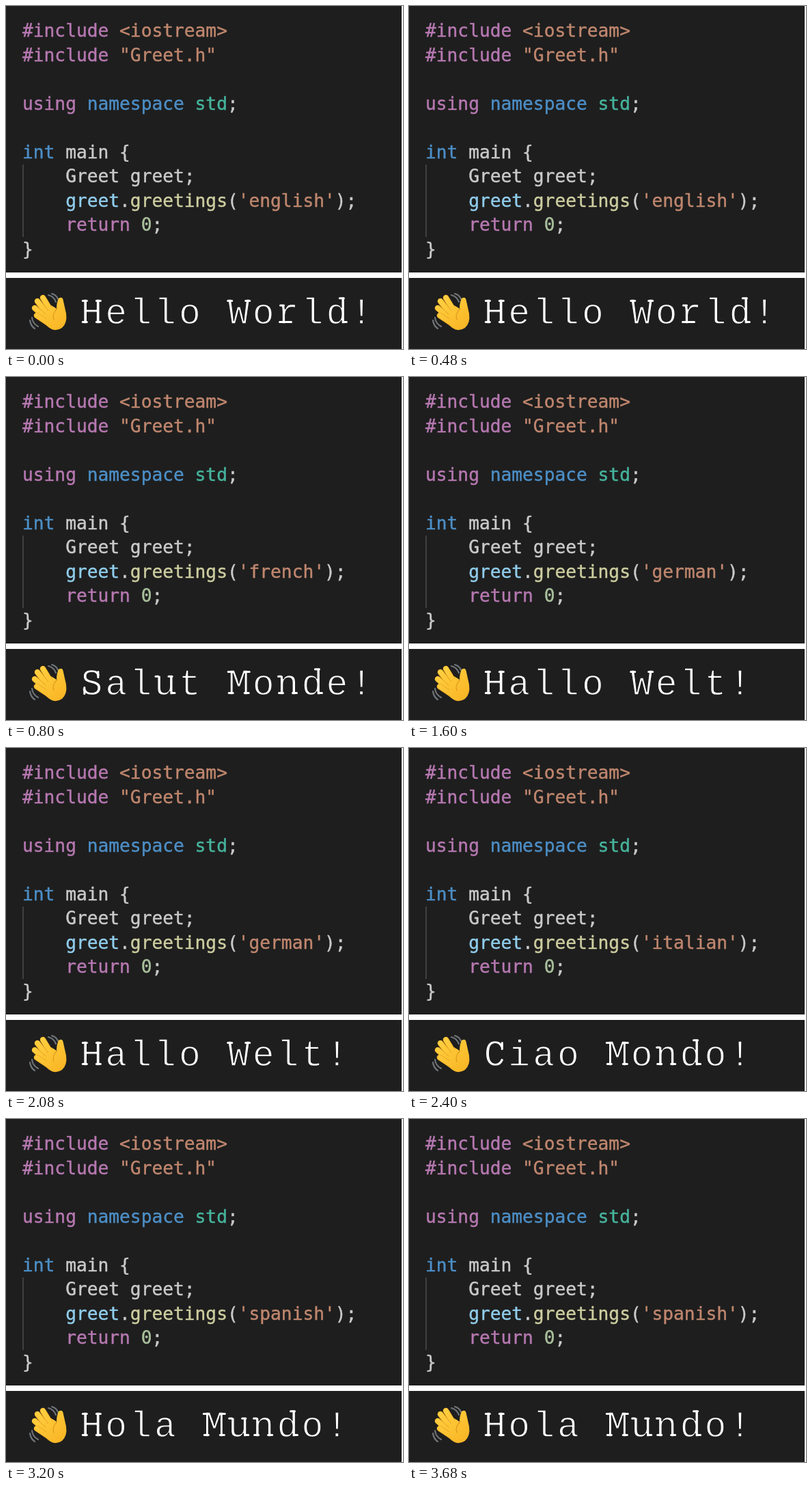
Write an HTML page with a canvas that moves like this. It is 581 px wide and 502 px high and loops after 4 s.

```html
<!DOCTYPE html>
<html lang="en">
<head>
<meta charset="utf-8">
<title>Greetings</title>
<style>
  html, body { margin: 0; width: 100%; height: 100%; overflow: hidden; background: #fff; }
  canvas { display: block; }
</style>
</head>
<body>
<canvas id="stage" width="581" height="502"></canvas>
<script>
const ctx = document.getElementById('stage').getContext('2d');
const HOLD = 800;
const BACKGROUND = '#1e1e1e';
const GREETINGS = [
  ['english', 'Hello World!'],
  ['french', 'Salut Monde!'],
  ['german', 'Hallo Welt!'],
  ['italian', 'Ciao Mondo!'],
  ['spanish', 'Hola Mundo!'],
];
const COLOR = {
  keyword: '#b678b1', type: '#4c8ec6', string: '#bf866e', space: '#46b49d',
  variable: '#90cdec', method: '#cdcda0', number: '#a9bf9c', plain: '#cacaca',
};
const CODE = { x: 24, baseline: 45, lineHeight: 35.55, font: '26.22px "DejaVu Sans Mono", monospace' };
const TITLE = { x: 125.3, baseline: 464.5, pitch: 35.9, font: '53px "Liberation Mono", monospace' };

// Each line is a list of [color name, text] tokens.
const codeLines = language => [
  [['keyword', '#include '], ['string', '<iostream>']],
  [['keyword', '#include '], ['string', '"Greet.h"']],
  [],
  [['keyword', 'using '], ['type', 'namespace '], ['space', 'std'], ['plain', ';']],
  [],
  [['type', 'int '], ['plain', 'main {']],
  [['plain', '    Greet greet;']],
  [['variable', '    greet'], ['plain', '.'], ['method', 'greetings'], ['plain', '('],
    ['string', `'${language}'`], ['plain', ');']],
  [['keyword', '    return '], ['number', '0'], ['plain', ';']],
  [['plain', '}']],
];

function drawCode(language) {
  ctx.font = CODE.font;
  ctx.textAlign = 'left';
  ctx.lineWidth = 0.45;
  codeLines(language).forEach((tokens, row) => {
    const y = CODE.baseline + row * CODE.lineHeight;
    let x = CODE.x;
    for (const [kind, text] of tokens) {
      ctx.fillStyle = ctx.strokeStyle = COLOR[kind];
      ctx.fillText(text, x, y);
      ctx.strokeText(text, x, y);
      x += ctx.measureText(text).width;
    }
  });
  ctx.fillStyle = '#404040';
  ctx.fillRect(24, 232, 2, 106);
}

function line(color, width, ...points) {
  ctx.strokeStyle = color;
  ctx.lineWidth = width;
  ctx.beginPath();
  points.forEach(([x, y]) => ctx.lineTo(x, y));
  ctx.stroke();
}

// Slab marks relative to the letter's centre and baseline.
const slab = (x, y, left = 3, right = 3) => [[x - left, y], [x + right, y]];
const tick = (x, top, bottom) => [[x, top], [x, bottom]];
const FOOT = -1.9, CAP = -33, MID = -26.3, ASCENDER = -36.8;
const SLABS = {
  H: [-10, 10].flatMap(x => [slab(x, CAP), slab(x, FOOT)]),
  M: [slab(-11.5, CAP, 4, 2), slab(11.5, CAP, 2, 4), slab(-11.5, FOOT), slab(11.5, FOOT)],
  W: [slab(-13, CAP), slab(13, CAP)],
  n: [slab(-10, MID, 4, 0), slab(-10, FOOT), slab(10, FOOT)],
  u: [slab(-10, MID, 4, 0), slab(10, MID, 5, 0), slab(10, FOOT, 0, 4)],
  d: [slab(10, ASCENDER, 6, 0), slab(10, FOOT, 0, 4)],
  r: [slab(-6, MID, 5, 0), slab(-6, FOOT, 6, 11)],
  C: [tick(11, CAP, -24)],
  S: [tick(9.5, CAP, -25), tick(-10.5, -10, -1)],
};

function drawTitle(text) {
  ctx.font = TITLE.font;
  ctx.textAlign = 'center';
  ctx.lineCap = 'round';
  ctx.lineJoin = 'round';
  [...text].forEach((letter, i) => {
    ctx.save();
    ctx.translate(TITLE.x + i * TITLE.pitch, TITLE.baseline);
    ctx.fillStyle = '#fff';
    ctx.fillText(letter, 0, 0);
    // A background outline thins the letter.
    ctx.strokeStyle = BACKGROUND;
    ctx.lineWidth = 1.3;
    ctx.strokeText(letter, 0, 0);
    for (const mark of SLABS[letter] || []) line('#fff', 3, ...mark);
    ctx.restore();
  });
}

function curve(path, color, width) {
  ctx.strokeStyle = color;
  ctx.lineWidth = width;
  ctx.stroke(new Path2D(path));
}

function drawHand() {
  ctx.lineCap = 'round';
  ctx.lineJoin = 'round';
  for (const arc of ['M62 423Q70 425 73 433', 'M67 421Q74 423 76 429',
    'M38 456Q39 465 47 469', 'M35 460Q36 468 42 472']) curve(arc, '#6f7478', 2.2);

  const skin = ctx.createLinearGradient(45, 430, 80, 472);
  skin.addColorStop(0, '#ffcf40');
  skin.addColorStop(1, '#f9b625');
  ctx.fillStyle = skin;
  ctx.fill(new Path2D('M52 446L66 438L74 443Q74 434 77 428Q83 424 84 432L88 450Q90 464 82 471Q72 478 62 470L49 458Z'));
  for (const finger of ['M68 450L54 427', 'M63 454L46 432', 'M61 459L42 442', 'M63 465L45 453']) {
    curve(finger, '#e39b1f', 8.6);
    curve(finger, skin, 7.4);
  }
  ctx.fill(new Path2D('M58 449L69 440L78 446L83 464L73 474L61 468Z'));
  curve('M75 443Q67 450 70 459', '#e39b1f', 1.3);
}

function render(now) {
  const [language, greeting] = GREETINGS[Math.floor(now / HOLD) % GREETINGS.length];
  ctx.fillStyle = '#fff';
  ctx.fillRect(0, 0, 581, 502);
  ctx.fillStyle = BACKGROUND;
  ctx.fillRect(0, 0, 579, 390);
  ctx.fillRect(0, 398, 579, 104);
  drawCode(language);
  drawTitle(greeting);
  drawHand();
}

const start = performance.now();
function animate() {
  render(performance.now() - start);
  requestAnimationFrame(animate);
}
animate();
</script>
</body>
</html>
```
